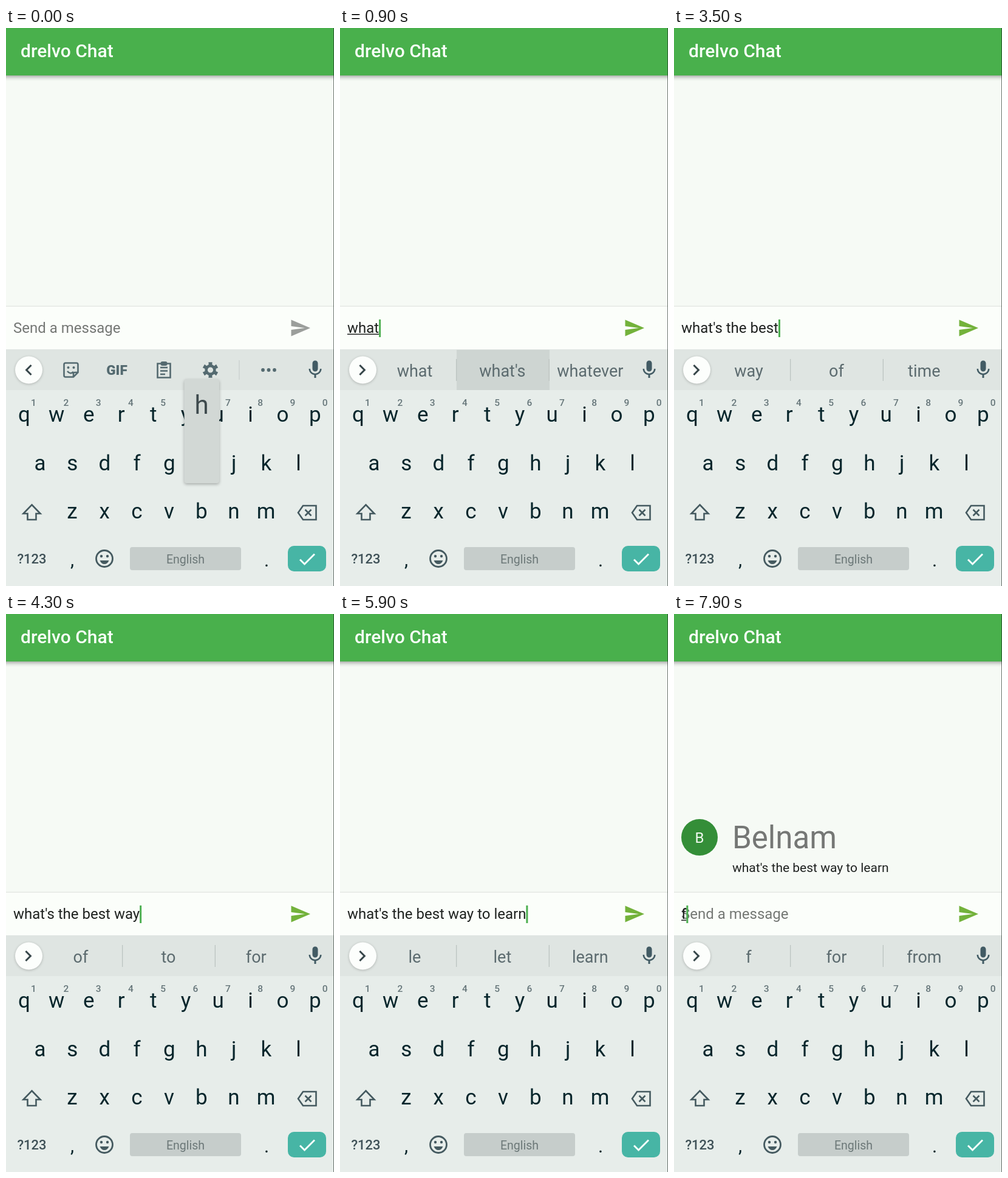
An HTML page with a canvas that plays this animation: 540x917 px, repeating every 8 s.

```html
<!DOCTYPE html>
<html lang="en">
<head>
<meta charset="utf-8">
<title>Chat</title>
<style>
html, body { margin: 0; width: 100%; height: 100%; overflow: hidden; background: #f6faf5; }
canvas { display: block; width: 540px; height: 917px; }
</style>
</head>
<body>
<canvas id="stage" width="540" height="917"></canvas>
<script>
const ctx = document.getElementById('stage').getContext('2d');
const LOOP = 8000, STEP = 100;
const ICON = '#546a70', KEY = '#08262c', SPECIAL = '#455a60';
const SENT = "what's the best way to learn";
const SENT_AT = 6900;

// Field content over time: start, text, length of the underlined tail
const TYPED = [
  [0, '', 0], [100, 'w', 1], [200, 'wh', 2], [400, 'wha', 3], [600, 'what', 4],
  [1100, "what's", 0], [2700, "what's the", 0], [3400, "what's the best", 0],
  [4200, "what's the best way", 0], [4700, "what's the best way to", 0],
  [5200, "what's the best way to l", 1], [5400, "what's the best way to le", 2],
  [5900, SENT, 0], [7000, '', 0], [7900, 'f', 1]
];
// Suggestion strip; an empty string shows the toolbar
const HINTS = [
  [0, ''], [100, 'w we what'], [200, 'wh what who'], [400, "wha what what's"],
  [600, "what what's whatever"], [1200, 'the app your'], [2800, 'way best new'],
  [3500, 'way of time'], [4300, 'of to for'], [4800, 'express get celebrate'],
  [5200, 'l learn live'], [5400, 'le let learn'], [6000, 'to how about'],
  [7100, ''], [7900, 'f for from']
];
const POPUPS = [[0, 'h'], [200, 'a'], [400, 't'], [5100, 'l'], [5300, 'e'], [7800, 'f']];
const PRESSED = [[900, 1100], [3200, 3400], [4500, 4700]];
const CARET_OFF = [[0, 100], [1700, 2000], [2200, 2500], [5600, 5900], [6300, 6600], [6900, 7000], [7300, 7600]];

const ROWS = [
  { keys: 'qwertyuiop', x: 30, y: 647 },
  { keys: 'asdfghjkl', x: 56, y: 727 },
  { keys: 'zxcvbnm', x: 109, y: 806 }
];

const at = (list, t) => list.filter(e => e[0] <= t).pop();
const within = (list, t) => list.some(([a, b]) => t >= a && t < b);

function text(str, x, y, size, color, align = 'left', weight = 400) {
  ctx.font = `${weight} ${size}px Roboto, sans-serif`;
  ctx.textAlign = align;
  ctx.fillStyle = color;
  ctx.fillText(str, x, y);
}
function rect(x, y, w, h, color, r = 0) {
  ctx.fillStyle = color;
  ctx.beginPath();
  ctx.roundRect(x, y, w, h, r);
  ctx.fill();
}
function circle(x, y, r, color) {
  ctx.fillStyle = color;
  ctx.beginPath();
  ctx.arc(x, y, r, 0, Math.PI * 2);
  ctx.fill();
}
function stroke(d, color, width, x = 0, y = 0) {
  ctx.save();
  ctx.translate(x, y);
  ctx.strokeStyle = color;
  ctx.lineWidth = width;
  ctx.stroke(new Path2D(d));
  ctx.restore();
}
function icon(d, x, y, color, scale = 1.5) {
  ctx.save();
  ctx.translate(x, y);
  ctx.scale(scale, scale);
  ctx.fillStyle = color;
  ctx.fill(new Path2D(d));
  ctx.restore();
}
function shadowed(blur, dy, alpha, draw) {
  ctx.save();
  ctx.shadowColor = `rgba(0,0,0,${alpha})`;
  ctx.shadowBlur = blur;
  ctx.shadowOffsetY = dy;
  draw();
  ctx.restore();
}

function gear(cx, cy) {
  ctx.beginPath();
  for (let i = 0; i < 6; i++) {
    const a = i * Math.PI / 3;
    for (const [da, r] of [[-.3, 9.3], [-.24, 13.2], [.24, 13.2], [.3, 9.3]])
      ctx.lineTo(cx + r * Math.cos(a + da + Math.PI / 2), cy + r * Math.sin(a + da + Math.PI / 2));
  }
  ctx.closePath();
  ctx.moveTo(cx + 4.6, cy);
  ctx.arc(cx, cy, 4.6, 0, Math.PI * 2);
  ctx.fillStyle = ICON;
  ctx.fill('evenodd');
}

function toolbar() {
  stroke('M-9 -11.5H9Q11.5 -11.5 11.5 -9V4L4 11.5H-9Q-11.5 11.5 -11.5 9V-9Q-11.5 -11.5 -9 -11.5ZM11.5 4H6Q4 4 4 6V11.5M-6 2Q-1 8 4 3', ICON, 2.6, 107, 562);
  circle(102.5, 558, 2, ICON);
  circle(111.5, 558, 2, ICON);
  text('GIF', 182.5, 570, 22.5, ICON, 'center', 900);
  stroke('M-10.5 -10.5H10.5V12.5H-10.5ZM-6 -4H6M-6 1.5H6M-6 7H2', ICON, 2.6, 260, 562);
  rect(254.5, 548, 11, 7, ICON, 3);
  gear(336.5, 562);
  rect(383.5, 546, 1, 32, '#c3cac8');
  for (const x of [423, 432.5, 442]) circle(x, 562, 2.9, ICON);
}

function suggestions(words, pressed) {
  if (pressed) rect(192, 529, 153, 66, '#ced5d2');
  rect(191, 544, 1.3, 36, '#bcc4c1');
  rect(343.7, 544, 1.3, 36, '#bcc4c1');
  words.split(' ').forEach((w, i) => text(w, 123 + i * 144.4, 573, 27, '#5c6b6f', 'center'));
}

function strip(t) {
  const words = at(HINTS, t)[1];
  rect(0, 528, 540, 67, '#dfe5e2');
  if (words) suggestions(words, within(PRESSED, t));
  else toolbar();
  shadowed(4, 1, .22, () => circle(37.5, 562, 22.5, '#fcfefc'));
  icon(words ? 'M10 6L8.59 7.41 13.17 12l-4.58 4.59L10 18l6-6z'
    : 'M15.41 7.41L14 6l-6 6 6 6 1.41-1.41L10.83 12z', words ? 18.5 : 19.5, 544, '#37474a');
  icon('M12 14c1.66 0 3-1.34 3-3V5c0-1.66-1.34-3-3-3S9 3.34 9 5v6c0 1.66 1.34 3 3 3zm5.3-3c0 3-2.54 5.1-5.3 5.1S6.7 14 6.7 11H5c0 3.41 2.72 6.23 6 6.72V21h2v-3.28c3.28-.48 6-3.3 6-6.72z', 491, 543.5, '#425b64');
}

function popup(key) {
  const row = ROWS.find(r => r.keys.includes(key));
  const x = row.x + row.keys.indexOf(key) * 53.2;
  shadowed(5, 2, .28, () => rect(x - 28.5, row.y - 150, 57.5, 171, '#d2d8d5', 4));
  text(key, x, row.y - 93, 42, '#3e4a4d', 'center');
}

function keyboard(t) {
  rect(0, 595, 540, 322, '#e7edea');
  ROWS.forEach(({ keys, x, y }, r) => [...keys].forEach((k, i) => {
    text(k, x + i * 53.2, y, 35, KEY, 'center');
    if (!r) text((i + 1) % 10, 45.5 + i * 53.3, 621, 15.5, '#66767a', 'center', 500);
  }));
  stroke('M0 -12.5L14 2H7V12H-7V2H-14Z', SPECIAL, 2.6, 42.5, 796);
  stroke('M-15 0L-7 -11.5H14.5V11.5H-7ZM-3.5 -5L6.5 5M6.5 -5L-3.5 5', SPECIAL, 2.6, 496, 796.5);
  text('?123', 42.5, 880, 22, '#3f5157', 'center', 500);
  text(',', 109, 884, 31, KEY, 'center');
  text('.', 429, 885, 31, KEY, 'center');
  stroke('M13.5 0A13.5 13.5 0 1 1 -13.5 0A13.5 13.5 0 1 1 13.5 0', SPECIAL, 2.8, 162, 872);
  circle(157, 868, 2.2, SPECIAL);
  circle(167, 868, 2.2, SPECIAL);
  icon('M-7.5 3H7.5Q5 9 0 9T-7.5 3Z', 162, 872, SPECIAL, 1);
  rect(204, 853, 183, 38, '#c6cdcb', 4);
  text('English', 295.5, 880, 19.5, '#6c7878', 'center');
  rect(464, 851, 63, 42, '#47b5a5', 10);
  stroke('M-12 0L-4.5 7.5L12 -9', '#f4fffb', 3, 496, 873.5);
  const p = at(POPUPS, t);
  if (t < p[0] + STEP) popup(p[1]);
}

function field(t) {
  const [start, str, tail] = at(TYPED, t);
  rect(0, 457, 540, 71, '#fbfefa');
  rect(0, 456.5, 540, 1.5, '#e5e9e4');
  // The hint lingers briefly beneath the first typed letter.
  if (!str || (str.length === 1 && t < start + STEP)) text('Send a message', 12, 501, 24, '#757875');
  text(str, 12, 501, 24, '#1f2220');
  const end = 12 + ctx.measureText(str).width;
  if (tail) {
    const from = 12 + ctx.measureText(str.slice(0, -tail)).width;
    rect(from, 502.5, end - from, 1.5, '#1f2220');
  }
  if (!within(CARET_OFF, t)) rect(end, 479, 3, 29, '#4caf50');
  icon('M2 21L23 12 2 3V10l15 2-15 2z', 466.5, 475, str ? '#73b23b' : '#9b9e9b');
}

function message(t) {
  const p = Math.min(1, (t - SENT_AT - STEP) / 350);
  if (p <= 0) return;
  const full = 122, bottom = 444;
  const height = full * (1 - (1 - p) ** 2.2);
  ctx.save();
  ctx.beginPath();
  ctx.rect(0, bottom - height, 540, height);
  ctx.clip();
  ctx.translate(0, (full - height) / 2);
  circle(42, 367, 30, '#348e38');
  text('B', 42, 375.5, 24, '#f2faf2', 'center');
  text('Belnam', 96, 385, 51, '#757775');
  text(SENT, 96, 424, 21, '#1f2220');
  ctx.restore();
}

function draw(now) {
  const t = Math.floor(now % LOOP / STEP) * STEP;
  rect(0, 0, 540, 917, '#f6faf5');
  message(t);
  shadowed(7, 2, .4, () => rect(-10, -10, 560, 88, '#49b04c'));
  text('drelvo Chat', 24, 47.5, 30, '#f8fff8', 'left', 500);
  field(t);
  strip(t);
  keyboard(t);
  rect(539, 0, 1, 917, 'rgba(20,30,25,.6)');
}

let begin;
function tick(now) {
  begin ??= now;
  draw(now - begin);
  requestAnimationFrame(tick);
}
draw(0);
requestAnimationFrame(tick);
</script>
</body>
</html>
```
